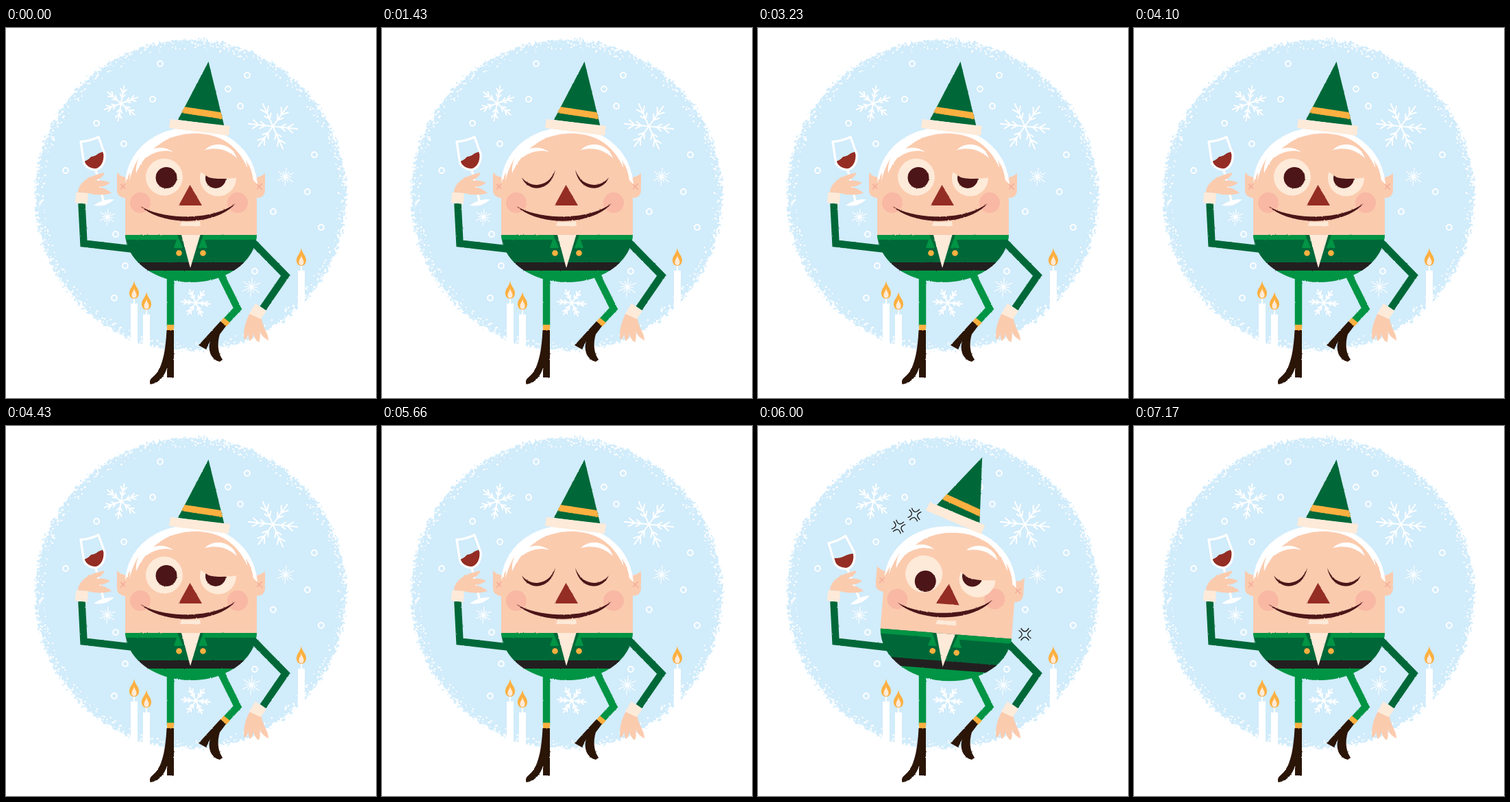
Recreate the animation shown at these times as an HTML page. Size 540x540 px, loop 7270 ms.

```html
<!DOCTYPE html>
<html lang="en">
<head>
<meta charset="utf-8">
<title>Merry elf</title>
<style>
html, body { margin: 0; width: 100%; height: 100%; overflow: hidden; background: #fff; }
svg { display: block; width: 100vw; height: 100vh; }
.skin { fill: #fbcbae; } .cream { fill: #feead8; } .dark { fill: #4c1518; }
.green { fill: #006838; } .leaf { fill: #009444; } .gold { fill: #fbb040; }
.boot { fill: #2a1507; } .wine { fill: #942d24; } .white { fill: #fff; }
.line { fill: none; stroke: #fff; stroke-linecap: round; stroke-linejoin: round; }
.limb { fill: none; stroke-width: 10.5; stroke-linejoin: miter; }
</style>
</head>
<body>
<svg viewBox="0 0 540 540">
  <defs>
    <filter id="rough" filterUnits="userSpaceOnUse" x="0" y="0" width="540" height="540" color-interpolation-filters="sRGB">
      <feTurbulence type="fractalNoise" baseFrequency=".35" numOctaves="2" seed="4"/>
      <feDisplacementMap in="SourceGraphic" scale="2" xChannelSelector="R" yChannelSelector="G"/>
    </filter>
    <filter id="spray" filterUnits="userSpaceOnUse" x="0" y="0" width="540" height="540" color-interpolation-filters="sRGB">
      <feTurbulence type="fractalNoise" baseFrequency=".22" numOctaves="3" seed="9"/>
      <feDisplacementMap in="SourceGraphic" scale="15" xChannelSelector="R" yChannelSelector="G"/>
    </filter>
    <clipPath id="torso"><path d="M174 300H366C365 341 322 371 270 371S175 341 174 300Z"/></clipPath>
    <clipPath id="lid"><path d="M278 206Q288 213 296 218Q312 222 340 218V250H278Z"/></clipPath>
    <clipPath id="bowl"><path id="bowlShape" d="M109 166Q123 165 135 159L144 184C145 196 139 206 130 207C121 206 113 201 113 192Z"/></clipPath>
  </defs>

  <circle cx="269.500" cy="244" r="227" fill="#d1ecfb" filter="url(#spray)"/>
  <path id="specks" class="white"/>
  <g id="snow" class="line" stroke-width="2"></g>
  <g id="candles"></g>

  <g filter="url(#rough)">
    <path class="limb" stroke="#009444" d="M240 355V436M310 353L338 409.500L318 431"/>
    <path class="gold" d="M235 433H245V441H235ZM318 423L327 430L321 436L313 428Z"/>
    <path class="boot" d="M234.500 441H245V510H235V496C231 510 221 519 210.500 520C208 511 215 511 221 502C229 490 233 470 234.500 441Z"/>
    <path class="boot" d="M313 428L321 435L312 447C308 460 309 474 316 484L312 487C299 484 294 470 298 457L292 469L281 463Z"/>
    <path class="limb" stroke="#006838" d="M205 325L113.500 314.500L110.500 256M348 300L408 361L375 409"/>
  </g>

  <g id="body" filter="url(#rough)">
    <g class="tilt">
      <path class="skin" d="M162 211Q168 218 177 218V248Q162 249 162 236ZM378 211Q374 218 363 218V248Q378 249 378 236Z"/>
      <path d="M167 228L175 235M174 227L167 236M366 228L374 236M374 227L366 235" fill="none" stroke="#f3a995" stroke-width="1.300"/>
      <path class="skin" d="M174 304V242C174 184 213 146 270 146S366 184 366 242V304Z"/>
      <g clip-path="url(#torso)">
        <path class="green" d="M170 302H370V345H170Z"/>
        <path class="leaf" d="M170 302H250L258 321H245L249 309H170ZM370 302H288L281 321H294L290 309H370ZM170 353H370V375H170Z"/>
        <path fill="#231f20" d="M170 342H370V354H170Z"/>
        <path class="cream" d="M256 302H283.500L269 350.500Z"/>
      </g>
      <circle class="gold" cx="252.500" cy="328.500" r="4.300"/><circle class="gold" cx="287.500" cy="328.500" r="4.300"/>
      <path class="white" d="M174 226C176 181 215 145 270 145S364 181 367 228L361 222C359 208 355 200 350 193L353 205C344 186 334 174 320 165C305 157 290 153 272 154C247 155 228 164 215 177C203 188 195 200 190 212C189 203 191 196 194 189C187 201 183 211 180 223L181 210Z"/>
      <path class="white" d="M194 199C201 178 225 167 244 181C227 176 212 183 201 192ZM290 178C305 164 330 169 337 190C323 177 309 174 290 178Z"/>
    </g>
    <g id="grin">
      <g fill="#f8b8a4"><circle cx="196" cy="255" r="15"/><circle cx="338" cy="255" r="15"/></g>
      <path class="dark" d="M196 260C231 281 302 281 335 256C307 289 229 290 196 260Z"/>
    </g>
    <g class="tilt">
      <path class="cream" d="M256 283Q270 284 283 282L284 289H254Z"/>
      <path class="wine" d="M268.500 229L286 259H252Z"/>
      <g id="leftOpen">
        <circle class="cream" cx="231" cy="217.500" r="27"/>
        <circle id="leftPupil" class="dark" cx="234" cy="218.500" r="15.500"/>
      </g>
      <path id="leftShut" class="dark" d="M204 218C212 240 246 241 253 207C243 234 216 234 204 218Z"/>
      <g id="rightOpen" clip-path="url(#lid)">
        <circle class="cream" cx="309.500" cy="219" r="26.500"/>
        <circle id="rightPupil" class="dark" cx="306" cy="219" r="15"/>
      </g>
      <path id="rightShut" class="dark" d="M282 207C289 241 323 240 331 218C319 234 292 234 282 207Z"/>
    </g>
  </g>

  <g filter="url(#rough)"><g id="hat">
    <path class="green" d="M295.500 49L318.500 143L251 134Z"/>
    <path class="gold" d="M260.500 115L313.500 123L316 133L256.500 124Z"/>
    <path class="cream" d="M240 133L327 143L325 157L238 146Z"/>
  </g></g>

  <g id="glass">
    <path id="wine" class="wine" clip-path="url(#bowl)"/>
    <use href="#bowlShape" class="line" stroke-width="3.300"/>
    <path class="line" stroke-width="3.300" d="M131 207L142 252"/>
    <path class="white" d="M128 259Q141 249 158 250Q146 262 128 259Z"/>
  </g>
  <g filter="url(#rough)">
    <path class="skin" d="M105 240C107 224 120 216 144 211C142 218 134 221 130 223Q143 221 152 226Q144 232 134 232Q147 234 154 241Q139 246 119 241Z"/>
    <path class="cream" d="M102 240L120 241L119 257L101 255Z"/>
    <path class="skin" d="M356 416L373 424C374 437 383 444 383 456Q373 451 370 442Q372 451 369 459Q361 453 361 443Q362 451 356 457Q353 451 354 444Q353 452 348 455C345 442 350 428 356 416Z"/>
    <path class="cream" d="M364 402L380 413L372 425L355 417Z"/>
  </g>
  <g id="hiccups" fill="none" stroke="#231f20" stroke-width="1.400" stroke-linecap="round"></g>
</svg>
<script>
const $ = id => document.getElementById(id);

// Seeded noise for the sprayed rim
let seed = 17;
const rand = () => (seed = seed * 16807 % 2147483647) / 2147483647;
let specks = "";
for (let i = 0; i < 1000; i++) {
  const a = rand() * Math.PI * 2, r = 230 - 16 * rand() ** 1.6, s = 0.8 + rand() * 1.7;
  const x = 269.5 + r * Math.cos(a), y = 244 + r * Math.sin(a);
  specks += `M${x.toFixed(1)} ${y.toFixed(1)}l${s} ${s * .4}l${-s * .5} ${s}l${-s} ${-s * .5}z`;
}
$("specks").setAttribute("d", specks);

const spokes = (n, turn, d) => Array.from({ length: n }, (_, i) =>
  `<path d="${d}" transform="rotate(${turn + i * 360 / n})"/>`).join("");
const at = (x, y, inner) => `<g transform="translate(${x} ${y})">${inner}</g>`;

const flake = (x, y, r, turn) => {
  const vee = (k, w) => `M${-w * r} ${-(k + w * 1.4) * r}L0 ${-k * r}L${w * r} ${-(k + w * 1.4) * r}`;
  return at(x, y, spokes(6, turn, `M0 0V${-r}` + vee(.32, .14) + vee(.58, .17)));
};
const star = (x, y, r) => at(x, y, `<g stroke-width="1.1">${
  spokes(6, 5, `M0 0V${-r}`)}${spokes(6, 35, `M0 0V${-r * .65}`)}</g>`);
const rings = [[225, 52], [352, 69], [324, 89], [342, 114], [214, 104], [132, 139], [172, 169], [87, 208],
  [450, 185], [440, 239], [390, 268], [460, 291], [160, 301], [174, 347], [363, 355], [158, 394]];
$("snow").innerHTML =
  flake(168, 110, 26, 10) + flake(389.5, 143.5, 36, 36) + flake(277, 401, 21, 35) +
  star(408, 217, 13) + star(148, 276, 12) + star(358, 378, 14) +
  rings.map(([x, y]) => `<circle cx="${x}" cy="${y}" r="3.9"/>`).join("");

const candle = (x, y, h) => at(x, y, `
  <path class="white" d="M-5 33H-1V24H1V33H5V${33 + h}H-5Z"/>
  <path class="gold" d="M0 0C1 8 7 11 7 18C7 23 4 26 0 26S-7 23 -7 18C-7 11 -1 8 0 0Z"/>
  <path class="cream" d="M0 11C1 16 3.500 17 3.500 20.500S2 25 0 25S-3.500 24 -3.500 20.500S-1 16 0 11Z"/>`);
$("candles").innerHTML = candle(187, 369, 62) + candle(205, 385, 52) + candle(431, 321, 60);

const hiccup = (x, y, turn) => at(x, y, spokes(4, turn, "M-5.500 -8.500Q0 0 5.500 -8.500"));
$("hiccups").innerHTML = hiccup(205, 147, 15) + hiccup(228.5, 129.5, 10) + hiccup(389.5, 304, 0);

const steps = [
  [0, "wink"], [1430, "shut"], [2060, "peek"], [2960, "shut"], [3230, "wink"],
  [4000, "shut"], [4100, "wink"], [4330, "shut"], [4430, "wink"],
  [5660, "shut"], [5760, "wink"], [5830, "shut"], [6000, "hic"], [7170, "shut"]
];
const LOOP = 7270;

const show = (id, on) => $(id).setAttribute("display", on ? "inline" : "none");
const set = (id, attrs) => Object.entries(attrs).forEach(([k, v]) => $(id).setAttribute(k, v));

function pose(name) {
  const hic = name === "hic", left = hic || name === "wink", right = name !== "shut";
  show("leftOpen", left);
  show("leftShut", !left);
  show("rightOpen", right);
  show("rightShut", !right);
  show("hiccups", hic);
  const tilt = hic ? "translate(.5 1) rotate(4.5 270 351)" : "";
  document.querySelectorAll(".tilt").forEach(g => g.setAttribute("transform", tilt));
  set("grin", { transform: hic ? "translate(7.5 -2.5)" : "" });
  set("hat", { transform: hic ? "translate(1 1) rotate(16 326 156)" : "" });
  set("glass", { transform: hic ? "translate(2 1) rotate(-8 133 225)" : "" });
  set("leftPupil", { cy: hic ? 228 : 218.5 });
  set("rightPupil", { cx: hic ? 302 : 306, cy: hic ? 215.5 : 219 });
  set("wine", { d: hic
    ? "M110 188Q121 191 129 188T148 187V212H108Z"
    : "M110 196Q119 194 124 188Q131 187 135 183L146 179V212H108Z" });
}

let current;
function tick() {
  const t = performance.now() % LOOP;
  const name = steps.findLast(([start]) => start <= t)[1];
  if (name !== current) pose(current = name);
  requestAnimationFrame(tick);
}
tick();
</script>
</body>
</html>
```
